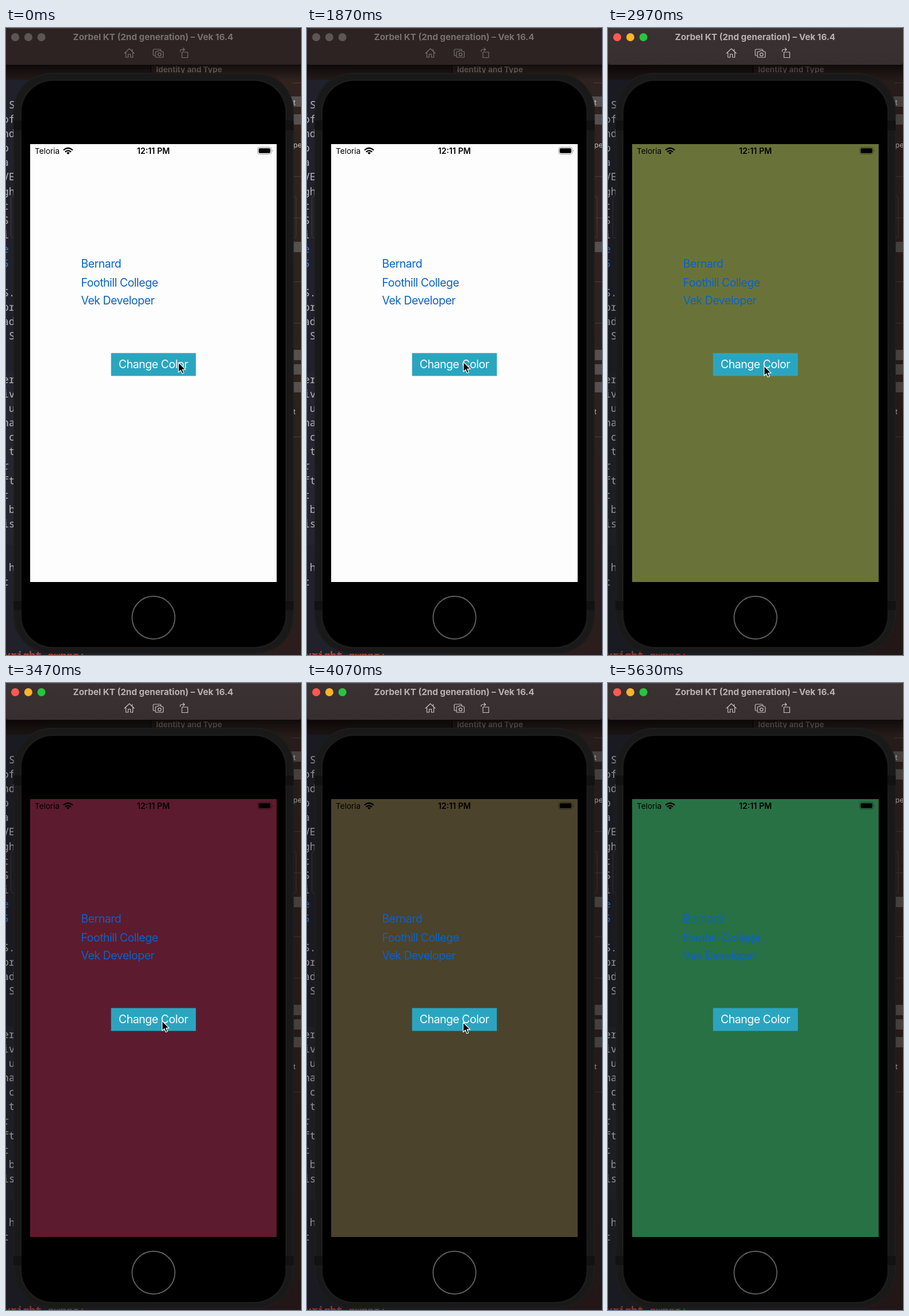
An HTML page for the animation above (5.66 s loop, 513x1091 px).

```html
<!DOCTYPE html>
<html lang="en">
<head>
<meta charset="utf-8">
<title>Change Color</title>
<style>
  html, body { margin: 0; width: 100%; height: 100%; overflow: hidden; background: #231a19; }
  svg { display: block; width: 513px; height: 1091px; font-family: Inter, Roboto, sans-serif; }
  .code { font: 18px "Noto Sans Mono", "DejaVu Sans Mono", monospace; fill: #b4b4b8; white-space: pre; }
  .label { font-size: 19.5px; letter-spacing: -.5px; }
  .icon { fill: none; stroke: var(--icon); stroke-width: 1.2; stroke-linejoin: round; stroke-linecap: round; }
  #win { --icon: #787170; --title: #78706f; }
  #win.active { --icon: #c5bfbe; --title: #b9b2b1; }
</style>
</head>
<body>
<svg viewBox="0 0 513 1091">
  <defs>
    <linearGradient id="bar" x2="0" y2="1">
      <stop offset="0" stop-color="#3b3132"/><stop offset="1" stop-color="#372f2f"/>
    </linearGradient>
    <linearGradient id="side" x2="0" y2="1">
      <stop offset="0" stop-color="#30231f"/><stop offset=".6" stop-color="#2d211e"/><stop offset="1" stop-color="#2a1d1b"/>
    </linearGradient>
    <linearGradient id="drop" x2="0" y2="1">
      <stop offset="0" stop-color="#000" stop-opacity=".6"/><stop offset="1" stop-color="#000" stop-opacity="0"/>
    </linearGradient>
  </defs>

  <g id="desk">
    <rect width="513" height="1091" fill="#241a19"/>
    <rect y="90" width="252" height="1001" fill="#20212a"/>
    <rect y="598" width="252" height="301" fill="#24252e"/>
    <rect x="252" y="64" width="261" height="1027" fill="url(#side)"/>
    <path d="M252 64V90" stroke="#0c0808" stroke-width="1.5"/>
    <text x="261" y="77" font-size="13.5" font-weight="700" fill="#8c8482">Identity and Type</text>
    <g id="panel"></g>
    <g id="code"></g>
    <text class="code" x="-3" y="1098" style="font-weight:700;fill:#a8443d">yright owner/</text>
    <rect y="64" width="513" height="28" fill="url(#drop)"/>
  </g>
  <rect id="shade" y="64" width="513" height="1027" fill="#000" opacity="0"/>

  <g id="win">
    <path d="M0 0H513V58Q513 64 507 64H6Q0 64 0 58Z" id="head" fill="#2d2323"/>
    <path d="M0 64.5H513" stroke="#0d0909"/>
    <path d="M5 .5H508" stroke="#5a5150" opacity=".6"/>
    <g id="lights"></g>
    <text x="256" y="21" text-anchor="middle" font-size="15.2" font-weight="700" fill="var(--title)">Zorbel KT (2nd generation) – Vek 16.4</text>
    <g class="icon">
      <path d="M206 44L214.5 36L223 44M208.5 42.5V51H212.5V45.5H216.5V51H220.5V42.5M219.5 40V37"/>
      <path d="M259 48H257Q256 48 256 47V38.5Q256 37 257.5 37H267.5Q269 37 269.5 39"/>
      <path d="M260 42Q260 41 261 41H263.5L265 39.5H269L270.5 41H272.5Q273.5 41 273.5 42V50Q273.5 51 272.5 51H261Q260 51 260 50Z"/>
      <circle cx="267" cy="46" r="2.7"/>
      <path d="M306 42H316V51.5H306ZM303 41V39.5Q303 37.5 305 37.5H310M308 35L310.5 37.5L308 40"/>
    </g>
  </g>

  <g id="phone">
    <rect x="13" y="78" width="487.500" height="1011" rx="66" fill="#191919"/>
    <rect x="14" y="79" width="485.5" height="1009" rx="65" fill="none" stroke="#222"/>
    <rect x="25.5" y="90.5" width="462" height="988" rx="56" fill="none" stroke="#1e1e1e" stroke-width="1.5"/>
    <path d="M13 161H27V178H13ZM486 161H500V178H486ZM13 997H27V1013H13ZM486 997H500V1013H486Z" fill="#121212"/>
    <rect x="27" y="92" width="459" height="985" rx="55"/>
    <circle cx="256.5" cy="1026" r="37.2" fill="none" stroke="#5b5b5b" stroke-width="2"/>
  </g>

  <rect id="screen" x="42" y="202" width="428.7" height="762" fill="#fdfdfd"/>
  <text x="50" y="219" font-size="13.6">Teloria</text>
  <text x="256.3" y="219" font-size="14.2" font-weight="600" text-anchor="middle">12:11 PM</text>
  <g fill="none" stroke="#000" stroke-width="2.3">
    <path d="M100 212.5Q108 205.5 116 212.5M102.8 215.6Q108 211.2 113.2 215.6"/>
    <path d="M105.2 217.2Q108 215 110.8 217.2L108 220Z" fill="#000" stroke="none"/>
  </g>
  <rect x="437.5" y="207.5" width="24" height="12" rx="3.6" fill="none" stroke="#000" stroke-opacity=".38"/>
  <rect x="439.3" y="209.3" width="20.4" height="8.4" rx="2.2"/>
  <path d="M463 211.5Q465 213.5 463 215.5Z" fill-opacity=".4"/>
  <g class="label" fill="#0963c8">
    <text x="130.5" y="416.5">Bernard</text>
    <text x="130.5" y="449.5">Foothill College</text>
    <text x="130.5" y="481">Vek Developer</text>
  </g>
  <rect x="182.7" y="565.6" width="147.5" height="39.8" fill="#2ba5bf"/>
  <text class="label" x="256.2" y="592" text-anchor="middle" fill="#fafdfe">Change Color</text>

  <path id="cursor" d="M0 0V17L3.9 13.5L6.5 19.5L9.3 18.3L6.8 12.4H12.2Z" fill="#000" stroke="#fff" stroke-width="1.2" stroke-linejoin="round"/>
</svg>
<script>
const LOOP = 5660;
const ACTIVATE = 2700;
const $ = id => document.getElementById(id);

function add(parent, tag, attrs, text = '') {
  const el = document.createElementNS('http://www.w3.org/2000/svg', tag);
  for (const k in attrs) el.setAttribute(k, attrs[k]);
  el.textContent = text;
  return $(parent).appendChild(el);
}

// Code behind the phone, one entry per line
const lines = ' S|of|nd|p|a|VE|gh|t|S|i|e|5||S.|pr|ad| S|||er|iv| u|ha| c| t|r|ft|t| b|is||| h|t'.split('|');
lines.forEach((text, i) => {
  const line = add('code', 'text', { class: 'code', x: -6, y: 139.7 + i * 25.15 }, text);
  if (text === 'e' || text === '5') line.style.fill = '#4d78d6';
});

// Inspector edge to the right of the phone
for (const y of [95, 258, 330, 441, 513, 711])
  add('panel', 'path', { d: `M498 ${y}.5H513`, stroke: '#4a3d3a' });
for (const y of [119, 150, 372, 560, 585, 616])
  add('panel', 'rect', { x: 480, y, width: 33, height: 18, fill: '#56504e' });
add('panel', 'rect', { x: 8.5, y: 292.5, width: 496, height: 73, rx: 4, fill: 'none', stroke: '#453a38' });
for (const [text, y] of [['t', 134], ['pe', 208], ['t', 672]])
  add('panel', 'text', { x: 499.5, y, 'font-size': 12.5, fill: '#c9c3c1' }, text);

const lightColors = ['#ff5950', '#fdb32b', '#28c53d'];
const lights = lightColors.map((_, i) => add('lights', 'circle', { cx: 16 + i * 22.8, cy: 16, r: 7 }));

const colors = [
  [0, '#fdfdfd'], [2830, '#697339'], [3370, '#5c1b2f'], [3970, '#4b432b'], [4570, '#287145']
];
// time, x, y of the pointer tip
const path = [
  [0, 300, 582], [120, 300, 582], [1000, 272, 581], [1870, 272, 581],
  [2500, 271.5, 588], [3470, 271.5, 588], [4070, 271.5, 590.5],
  [4900, 271.5, 590.5], [5400, -20, 650], [LOOP, -20, 650]
];

function pointer(t) {
  const i = path.findIndex(p => p[0] > t);
  const [t0, x0, y0] = path[i - 1], [t1, x1, y1] = path[i];
  const u = (t - t0) / (t1 - t0), e = u * u * (3 - 2 * u);
  return [x0 + (x1 - x0) * e, y0 + (y1 - y0) * e];
}

function draw(now) {
  const t = now % LOOP, active = t >= ACTIVATE;
  $('win').setAttribute('class', active ? 'active' : '');
  $('head').setAttribute('fill', active ? 'url(#bar)' : '#2d2323');
  $('shade').setAttribute('opacity', active ? .2 : 0);
  lights.forEach((c, i) => c.setAttribute('fill', active ? lightColors[i] : '#5d5655'));
  $('screen').setAttribute('fill', colors.filter(c => c[0] <= t).pop()[1]);
  $('cursor').setAttribute('transform', `translate(${pointer(t)})`);
}

function tick() {
  draw(performance.now());
  requestAnimationFrame(tick);
}
tick();
</script>
</body>
</html>
```
